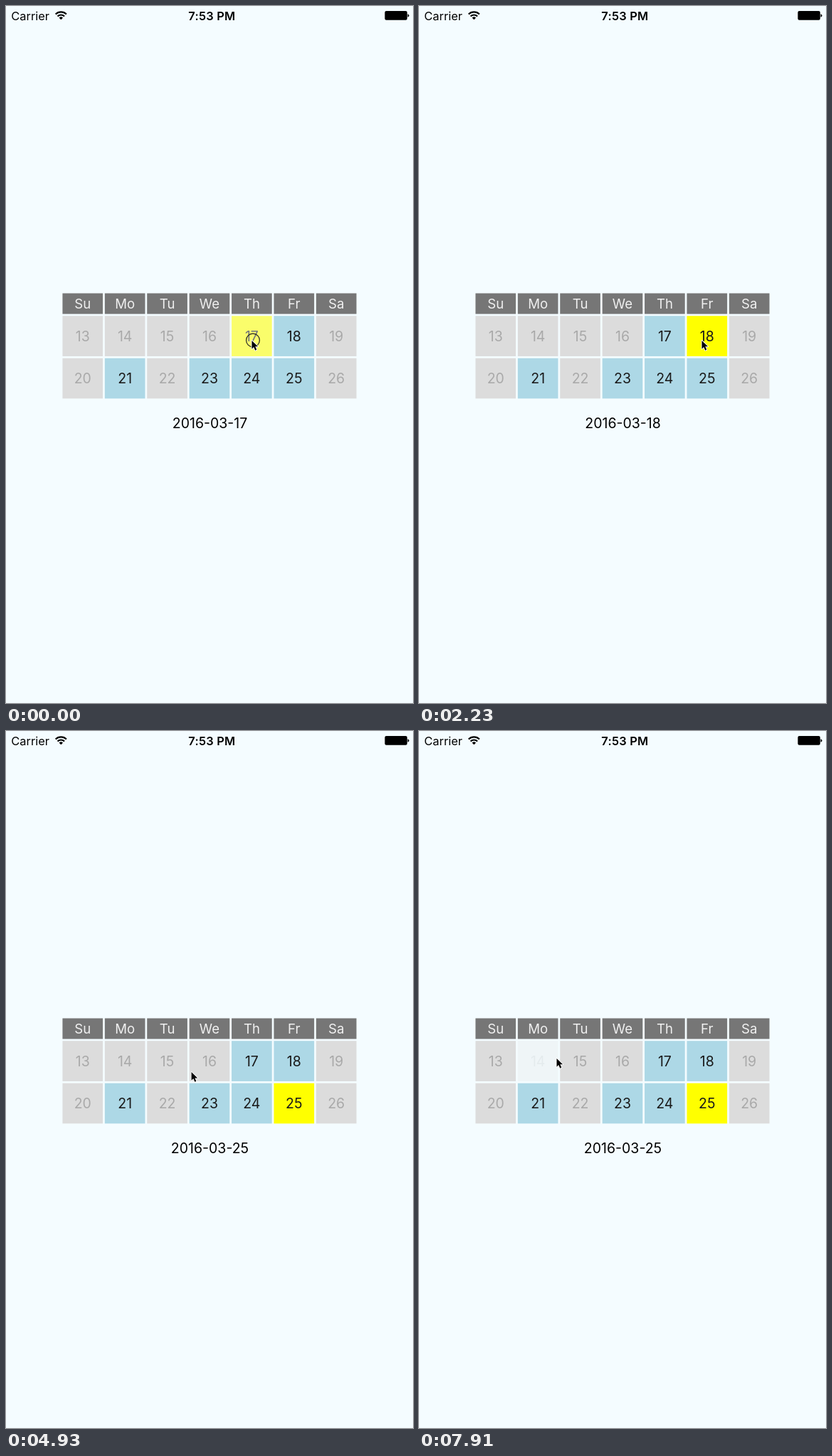
Write an HTML page that moves like this. It is 572 px wide and 979 px high and loops after 8 s.

```html
<!DOCTYPE html>
<html lang="en">
<head>
<meta charset="utf-8">
<title>Date picker</title>
<style>
  html, body { margin: 0; width: 100%; height: 100%; overflow: hidden; background: #f4fcff; }
  svg { display: block; width: 100%; height: 100%; }
  text { font: 400 19.5px Inter, sans-serif; text-anchor: middle; }
  .status { font-size: 16.4px; }
  .clock { font-weight: 600; letter-spacing: .25px; }
  .head rect { fill: #767676; }
  .head text { fill: #f0f0f0; font-size: 18.6px; }
  .day rect { fill: #dcdcdc; }
  .day text { fill: #a9a9a9; }
  .open rect { fill: #add8e6; }
  .open text { fill: #1a1a1a; }
  .picked rect { fill: #ff0; }
  .arrow { stroke: #fff; stroke-width: 1.8; stroke-linejoin: round; paint-order: stroke; }
  .ring { fill: none; stroke: #222; stroke-width: 1.2; }
</style>
</head>
<body>
<svg viewBox="0 0 572 979">
  <text class="status" x="7.3" y="19.5" style="text-anchor:start">Carrier</text>
  <g fill="none" stroke="#000" stroke-width="2.2">
    <path d="M69.7 11.5a10.8 10.8 0 0 1 15.2 0M72.5 14.5a6.8 6.8 0 0 1 9.6 0"/>
    <path d="M77.3 19.3l-2.7-2.8a3.9 3.9 0 0 1 5.4 0z" fill="#000" stroke="none"/>
  </g>
  <text class="status clock" x="289.4" y="19.5">7:53 PM</text>
  <rect x="532.4" y="7" width="31.4" height="12.8" rx="2"/>
  <path d="M564.5 11.2q2 .4 2 2.3t-2 2.3z"/>
  <g id="grid"></g>
  <text id="date" x="286.5" y="592.5"></text>
  <g id="pointer">
    <circle id="ring" class="ring" cx="1.5" cy="-.5" r="9.4"/>
    <path class="arrow" d="M0 0v11.7l2.7-2.6 2 4.6 2.1-.9-2-4.5h3.8z"/>
  </g>
</svg>
<script>
const LOOP = 8000, TICK = 149.25;
const POINT = 1.3816, CELL = 41 * POINT, PITCH = 43 * POINT;
const LEFT = 79.43, TOP = 435.3;
const $ = id => document.getElementById(id);
const clamp = v => Math.min(1, Math.max(0, v));
const ease = v => (1 - Math.cos(Math.PI * clamp(v))) / 2;

function addCell(label, col, y, h, cls) {
  const x = LEFT + PITCH * col;
  $('grid').insertAdjacentHTML('beforeend',
    `<g class="${cls}"><rect x="${x}" y="${y}" width="${CELL}" height="${h}"/>` +
    `<text x="${x + CELL / 2}" y="${y + h / 2 + 6.9}">${label}</text></g>`);
  return $('grid').lastElementChild;
}

const HEAD = 21 * POINT;
['Su', 'Mo', 'Tu', 'We', 'Th', 'Fr', 'Sa'].forEach((name, i) =>
  addCell(name, i, TOP - HEAD - 2 * POINT, HEAD, 'head'));

const open = [17, 18, 21, 23, 24, 25], days = {};
for (let i = 0; i < 14; i++) {
  const d = 13 + i, row = Math.floor(i / 7);
  days[d] = addCell(d, i % 7, TOP + PITCH * row, CELL, open.includes(d) ? 'day open' : 'day');
}

// All times are in ticks
const start = { x: 345.5, y: 470 };
const moves = [
  { at: 3, len: 7, x: 397.5, y: 470 },
  { at: 15, len: 3, x: 405, y: 540 },
  { at: 25, len: 2, x: 337.5, y: 534.5 },
  { at: 27, len: 4, x: 268, y: 470 },
  { at: 32, len: 4, x: 217.5, y: 532 },
  { at: 41, len: 3, x: 117.5, y: 523.5 },
  { at: 48, len: 4, x: 193.5, y: 460 }
];
const taps = [
  { day: 17, at: -2.5, hold: 3 },
  { day: 18, at: 11.6, hold: 1.5 },
  { day: 25, at: 23.9, hold: 1.2 },
  { day: 22, at: 38.6, hold: 1.2 },
  { day: 20, at: 45.6, hold: 1.5 },
  { day: 14, at: 51.3, hold: 1.2 }
];

function pointerAt(n) {
  return moves.reduce((p, m) => {
    const k = ease((n - m.at) / m.len);
    return { x: p.x + (m.x - p.x) * k, y: p.y + (m.y - p.y) * k };
  }, start);
}

// A tapped cell dims to 20 %, then recovers
const tapOpacity = k => 1 - .8 * clamp(Math.min(k, (3.4 - k) / 1.7));

function draw(t) {
  const n = Math.floor((t + 9) / TICK);
  let picked, ring = false;
  for (const { day, at, hold } of taps) {
    const k = n - at;
    days[day].setAttribute('opacity', tapOpacity(k));
    if (k >= 0 && k < hold) ring = true;
    if (k > 2 && open.includes(day)) picked = day;
  }
  for (const d of open) days[d].classList.toggle('picked', d === picked);
  $('date').textContent = '2016-03-' + picked;

  const { x, y } = pointerAt(n);
  $('pointer').setAttribute('transform', `translate(${x} ${y})`);
  $('ring').setAttribute('visibility', ring ? 'visible' : 'hidden');
}

let origin;
function loop(now) {
  origin ??= now;
  draw((now - origin) % LOOP);
  requestAnimationFrame(loop);
}
draw(0);
requestAnimationFrame(loop);
</script>
</body>
</html>
```
